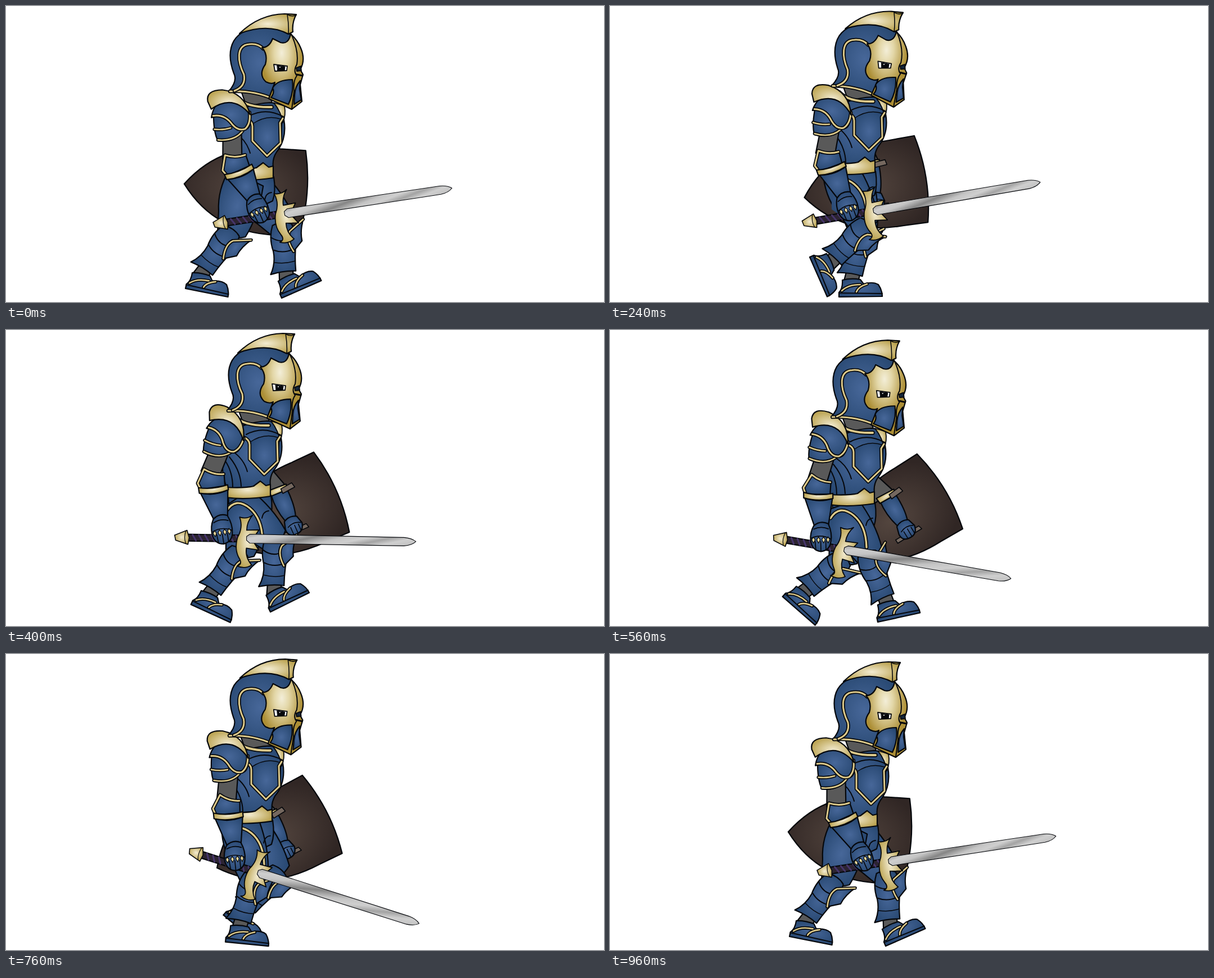
These frames come from a looping animation (1063x527 px, 1000 ms). An HTML page:

```html
<!DOCTYPE html>
<html lang="en">
<head>
<meta charset="utf-8">
<title>Walking knight</title>
<style>
html, body { margin: 0; width: 100%; height: 100%; overflow: hidden; background: #fff; }
svg { display: block; width: 100%; height: 100%; }
path { stroke: #05070b; stroke-width: 2.2; stroke-linejoin: round; stroke-linecap: round; }
</style>
</head>
<body>
<svg id="stage" viewBox="0 0 1063 527">
  <defs>
    <radialGradient id="blue" r=".62"><stop stop-color="#476799"/><stop offset="1" stop-color="#26466f"/></radialGradient>
    <radialGradient id="gold" r=".6"><stop stop-color="#f3ecd2"/><stop offset="1" stop-color="#b59b43"/></radialGradient>
    <radialGradient id="face" cx=".48" cy=".25" r=".5"><stop stop-color="#f3eed8"/><stop offset=".35" stop-color="#e3d7a8"/><stop offset="1" stop-color="#ac8e35"/></radialGradient>
    <radialGradient id="wood" r=".6"><stop stop-color="#54463f"/><stop offset="1" stop-color="#302624"/></radialGradient>
    <linearGradient id="steel" x2=".42" y2=".1" spreadMethod="reflect">
      <stop stop-color="#a3a3a3"/><stop offset=".3" stop-color="#cfcfcf"/><stop offset=".6" stop-color="#c4c4c4"/><stop offset="1" stop-color="#858585"/>
    </linearGradient>
  </defs>
</svg>
<script>
const BLUE = 'url(#blue)', GOLD = 'url(#gold)', GRAY = '#595959', TRIM = '#dcc98a';
const shape = (d, fill, width = 2.2) => `<path d="${d}" fill="${fill}" style="stroke-width:${width}"/>`;
const line = (d, width = 2) => shape(d, 'none', width);
const trim = (d, w = 3) => line(d, w + 3.4) + `<path d="${d}" fill="none" style="stroke:${TRIM};stroke-width:${w}"/>`;
const group = (id, ...parts) => `<g id="${id}">${parts.join('')}</g>`;

const leg = side => [
  group(side + 'Ankle', shape('M-12 50L-13 92L12 92L12 50Z', GRAY)),
  group(side + 'Foot',
    shape('M0 0L0-8Q7-15 6-30Q22-34 38-31L44-23Q60-28 70-22Q77-12 77-1Z', BLUE),
    line('M0-7L77-6'),
    trim('M5-11Q16-22 38-22', 2.6), trim('M31-9Q34-18 50-23', 2.6)),
  group(side + 'Thigh', shape('M-36-22Q-46 18-32 55L-24 86Q0 100 27 84Q38 40 30-12Z', BLUE)),
  group(side + 'Shin',
    shape('M-20-8Q-28 14-21 38Q-18 60-28 79Q-5 73 17 75Q16 44 22 10L14-9Q-2-16-20-8Z', BLUE),
    line('M-24 13Q-6 26 12 15'), line('M-20 36Q-2 44 17 35'), line('M-20 58Q0 62 17 57', 1.5),
    shape('M14 41Q0 18 8 3L36-18Q28 4 31 22Z', BLUE),
    trim('M15 40Q2 18 10 4L35-16', 2.6))
].join('');

const shield = group('shield',
  shape('M0-78Q18 0 0 78L-45 77C-110 78-165 60-210 0C-165-60-110-78-45-77Z', 'url(#wood)'),
  shape('M-112-42L-110-96L-84-92L-70-44Z', GRAY),
  shape('M-112 33L-64 33L-62 40L-112 40Z', '#75685f', 1.6),
  shape('M-100-40L-70-38Q-69-5-76 14L-96 14Q-104-12-100-40Z', BLUE),
  shape('M-103-48L-68-46L-69-36L-102-37Z', GOLD),
  shape('M-80-42L-58-44L-56-35L-80-33Z', '#75685f', 1.6),
  shape('M-98 14Q-86 7-74 14L-70 28Q-73 44-88 43Q-103 42-102 28Z', BLUE),
  line('M-96 26Q-84 20-72 27M-92 28L-92 41M-84 27L-84 42M-77 28L-77 40', 1.6));

const torso = group('torso',
  shape('M416 146L468 156L476 182L428 180Z', GRAY),
  shape('M400 302L476 304Q480 330 474 347Q440 366 402 345Z', BLUE),
  shape('M402 194Q428 174 470 172Q490 172 494 202Q500 236 481 260Q473 272 475 287L398 292Q386 262 392 242Q404 220 402 194Z', BLUE),
  shape('M476 172L495 178Q498 194 492 208Q490 190 476 172Z', GOLD, 1.8),
  trim('M412 164Q428 181 472 180', 4),
  line('M432 196Q462 180 493 197'),
  line('M394 242Q408 262 408 290M402 236Q422 260 423 288M408 226Q428 240 434 262'),
  shape('M438 210Q464 192 491 202L488 244L464 268L438 240Z', BLUE, 1.5),
  trim('M427 201Q438 205 438 214L438 240L464 267L488 244L487 208L492 200'));

const belt = group('belt',
  line('M460 345Q462 333 472 332', 1.8),
  shape('M394 290Q430 292 445 288L457 279L467 287L475 285L475 306Q430 313 396 308Z', GOLD));

const tasset = group('tasset',
  `<path d="M398 330Q412 308 437 327Q460 345 461 384Q430 396 398 372Z" fill="${BLUE}" style="stroke:none"/>`,
  trim('M397 332Q413 307 438 327Q460 345 461 384', 3.4));

const head = group('head', '<g transform="translate(-487 -110)">',
  shape('M396 152Q412 133 405 120Q392 85 405 62Q420 38 462 36Q490 38 505 50Q512 100 500 130L478 166Q440 150 414 154Z', BLUE),
  trim('M398 152Q440 150 474 165'),
  trim('M406 151Q427 143 423 122C412 100 408 70 432 68Q448 66 457 76'),
  shape('M415 49Q450 15 495 14L516 15Q508 30 510 46L502 50Q466 30 415 49Z', GOLD),
  line('M500 15Q503 34 502 49M500 15Q508 20 516 16', 1.6),
  shape('M506 50Q502 69 488 65L474 58Q468 74 455 74Q466 86 461 104Q448 122 462 135Q472 140 478 136L467 165L508 184L526 170L523 140L528 122L523 113Q533 96 524 75Q518 60 506 50Z', 'url(#face)'),
  shape('M474 146Q482 131 509 131Q512 154 502 175L471 163Q478 154 474 146Z', BLUE),
  shape('M523 133Q514 143 513 158L512 175L525 167L522 148Z', BLUE),
  line('M507 50Q521 80 517 104Q510 116 517 124Q510 134 512 152L508 183'),
  line('M517 122L527 124', 3),
  shape('M476 104L500 107L499 115L478 116Z', '#fff', 1.8),
  shape('M482 106L496 108L495 115L483 115Z', '#05070b', 1),
  shape('M486 108L488 108L488 110L486 110Z', '#fff', .3),
  shape('M516 110L524 107L525 115L517 116Z', '#14253a', 1.8),
  '</g>');

const upperArm = group('upperArm',
  shape('M-15 36L18 34L18 80L-16 78Z', GRAY),
  shape('M-31-4Q-32 30-24 46Q6 50 22 28L20-4Z', BLUE),
  trim('M-30 25Q-14 27-1 23', 2.6), trim('M-24 44Q6 47 20 29', 2.6),
  shape('M-35 4Q-30-28 0-28Q33-20 34 5Q36 28 20 27Q6 24-2 12Q-14-2-35 4Z', BLUE),
  trim('M-32 1Q-11-2 2 17Q13 30 25 25Q35 16 33-4'));

const pauldron = group('pauldron', shape('M-41-25Q-44-45-15-45Q24-40 34 0Q4-38-35-11Z', GOLD));

const sword = group('sword',
  shape('M-60-6L34-6L34 6L-60 6Z', '#2c2431'),
  [...Array(8)].map((_, i) => `<path d="M${-50 + i * 11}-5l6 10" style="stroke:#46356b;stroke-width:3"/>`).join(''),
  shape('M-82-4L-60-13L-56 0L-58 12L-80 5Z', GOLD, 1.6),
  line('M-62-12Q-66 0-62 10', 1.2),
  shape('M56-42Q46-34 33-38Q40-20 30-2Q24 20 34 36Q40 46 30 49Q44 55 56 47Q44 34 46 17L68 20L56 2L68-16L46-15Q46-30 56-42Z', GOLD, 1.8),
  shape('M46-4L52-8L326-7Q340-6 347 0Q340 7 326 8L52 8L46 3Z', 'url(#steel)', 1.1));

const forearm = group('forearm',
  shape('M-26 16L-10-9Q5 5 24 6L22 28L-22 28Z', BLUE),
  trim('M-22 26L-25 16L-10-7Q5 6 23 7'),
  shape('M-23 34Q2 44 26 36L18 84Q5 76-7 84Z', BLUE),
  shape('M-25 24Q0 32 27 27L27 36Q0 42-25 34Z', GOLD),
  shape('M-8 84Q4 74 18 81Q25 98 22 112Q20 128 4 130Q-12 128-14 110Q-15 96-8 84Z', BLUE),
  line('M-13 106Q4 98 22 108M-6 112L-5 127M4 112L4 129M13 112L13 127M-8 90Q5 84 18 90', 1.7),
  [-9, 0, 9, 17].map(x => shape(`M${x} 104l3 5l-3 6l-3-6z`, '#ead99c', 1.2)).join(''));

const stage = document.getElementById('stage');
stage.insertAdjacentHTML('beforeend', [
  shield, leg('far'), torso, leg('near'), belt, tasset,
  upperArm, pauldron, head, sword, forearm
].join(''));

// Each channel holds eight poses, 120 ms apart, that repeat every 960 ms.
const pose = {
  torsoX: [0, -2, -4, -5, -5, -5, -2, -2],
  torsoY: [0, 3, -10, -14, -2, 5.5, -6, -13],
  headX: [487, 487, 487, 484, 484, 485, 487, 486],
  headY: [110, 116, 105, 98, 110, 116, 109, 97],
  headTurn: [0, 1.5, 3, 0, .3, .8, 1.5, 0],
  shoulderX: [400, 397, 395, 391, 389, 391, 396, 398],
  shoulderY: [194, 198, 188, 181, 191, 195, 186, 177],
  armTurn: [-1, 4, 10, 21, 23, 14, 6.5, 0],
  foreTurn: [-24, -23, -20, -10, -7, 2, -4, -10],
  swordTurn: [-8.7, -9.5, -9.8, -3, 9, 10.2, 20.5, 11.7],
  shieldX: [526, 538, 553, 575, 586, 586.5, 569.5, 547.5],
  shieldY: [335, 325, 308, 290, 286, 288, 281, 294.5],
  shieldTurn: [5, -1, -9, -22, -28, -33, -30, -21],
  nearX: [319, 303, 355, 460, 490, 469, 413, 344],
  nearY: [503, 472, 447, 493, 520, 520, 519, 500],
  nearTurn: [12, 43, 67, -27, -23, -6, 2, 15],
  farX: [490, 470, 407, 338, 310, 305, 347, 465],
  farY: [520, 519, 518, 493, 480, 472, 447, 500],
  farTurn: [-23, -4, 0, 18, 40, 43, 71, -19]
};
const THIGH = 90, SHIN = 84, UPPER_ARM = 74, FOREARM = 119, RAD = Math.PI / 180;

function sample(ms) {
  const step = Math.floor(ms / 120), mix = ms / 120 - step, now = {};
  for (const [key, v] of Object.entries(pose)) {
    now[key] = v[step % 8] * (1 - mix) + v[(step + 1) % 8] * mix;
  }
  return now;
}

function place(id, x, y, deg = 0) {
  document.getElementById(id).setAttribute('transform', `translate(${x} ${y}) rotate(${deg})`);
}

const hang = (x, y, length, deg) => [x - length * Math.sin(deg * RAD), y + length * Math.cos(deg * RAD)];
const droop = (dx, dy) => Math.atan2(-dx, dy) / RAD;

// Two-bone leg: the knee always bends forward.
function poseLeg(side, hipX, hipY, footX, footY, footTurn) {
  const c = Math.cos(footTurn * RAD), s = Math.sin(footTurn * RAD);
  const dx = footX + 23 * c + 32 * s - hipX, dy = footY + 23 * s - 32 * c - hipY;
  const reach = Math.hypot(dx, dy);
  const along = Math.min(THIGH, (THIGH ** 2 - SHIN ** 2 + reach ** 2) / (2 * reach));
  const out = Math.sqrt(THIGH ** 2 - along ** 2);
  const kx = (dx * along + dy * out) / reach, ky = (dy * along - dx * out) / reach;
  const shinTurn = droop(dx - kx, dy - ky);
  place(side + 'Thigh', hipX, hipY, droop(kx, ky));
  place(side + 'Shin', hipX + kx, hipY + ky, shinTurn);
  place(side + 'Ankle', hipX + kx, hipY + ky, shinTurn);
  place(side + 'Foot', footX, footY, footTurn);
}

function draw() {
  const ms = Math.floor(performance.now() % 1000 / 40) * 40;
  const p = sample(ms);
  for (const id of ['torso', 'belt', 'tasset']) place(id, p.torsoX, p.torsoY);
  document.getElementById('tasset').style.display = ms >= 160 && ms <= 760 ? '' : 'none';
  place('head', p.headX, p.headY, p.headTurn);
  place('shield', p.shieldX, p.shieldY, p.shieldTurn);
  poseLeg('near', 425 + p.torsoX, 323 + p.torsoY, p.nearX, p.nearY, p.nearTurn);
  poseLeg('far', 441 + p.torsoX, 325 + p.torsoY, p.farX, p.farY, p.farTurn);
  place('upperArm', p.shoulderX, p.shoulderY, p.armTurn);
  place('pauldron', p.shoulderX, p.shoulderY, p.armTurn);
  const elbow = hang(p.shoulderX, p.shoulderY, UPPER_ARM, p.armTurn);
  place('forearm', ...elbow, p.foreTurn);
  place('sword', ...hang(...elbow, FOREARM, p.foreTurn), p.swordTurn);
  requestAnimationFrame(draw);
}
draw();
</script>
</body>
</html>
```
